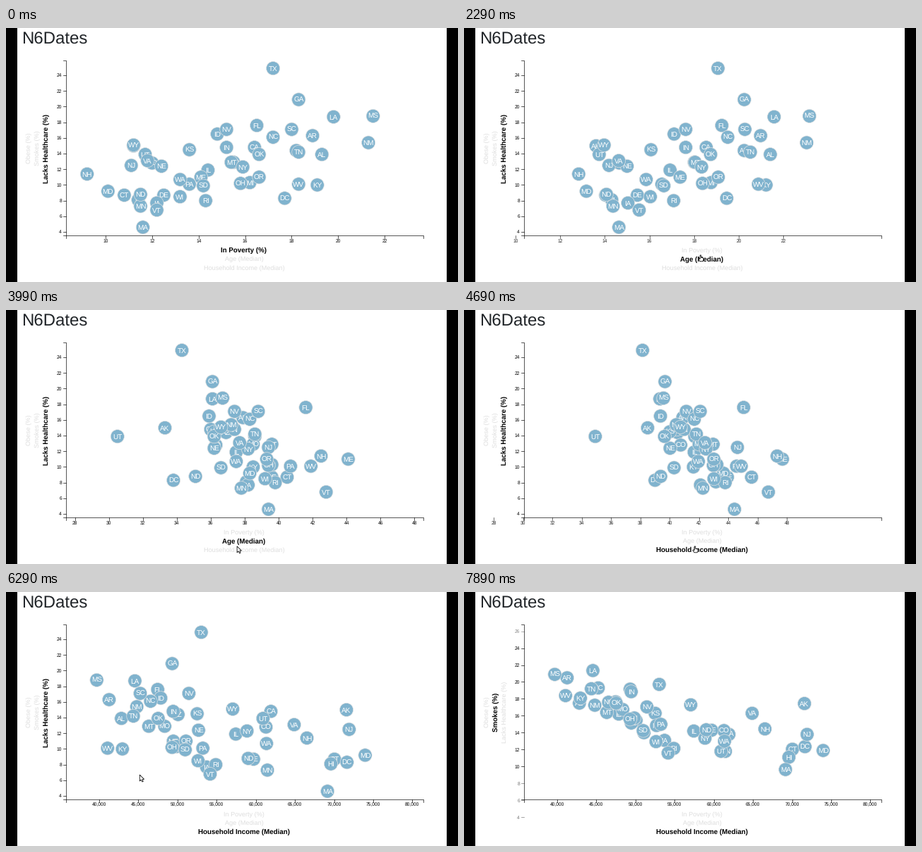
These frames come from a looping animation (640x360 px, 7.99 s). A matplotlib script:

```python
import numpy as np
import matplotlib.pyplot as plt
from matplotlib.animation import FuncAnimation
from matplotlib.patches import Circle, Polygon, Rectangle

plt.rcParams["font.family"] = "Liberation Sans"
plt.rcParams["text.hinting"] = "none"

W, H = 640, 360
FRAMES, INTERVAL = 170, 47
PT = 0.72  # points per pixel at 100 dpi
LEFT, RIGHT, TOP, BOTTOM = 84.5, 590.5, 46, 293.5
BLUE, PALE = "#80b3ce", "#dedede"

STATES = """AL AK AZ AR CA CO CT DE DC FL GA HI ID IL IN IA KS KY LA ME MD MA MI MN
MS MO MT NE NV NH NJ NM NY NC ND OH OK OR PA RI SC SD TN TX UT VT VA WA WV WI
WY""".split()

poverty = [19.3, 11.2, 18.2, 18.9, 16.4, 12, 10.8, 12.5, 17.7, 16.5, 18.3, 11.4, 14.8,
           14.4, 15.2, 12.2, 13.6, 19.1, 19.8, 14.1, 10.1, 11.6, 16.2, 11.5, 21.5, 15.5,
           15.4, 12.4, 15.2, 9.2, 11.1, 21.3, 15.9, 17.2, 11.5, 15.8, 16.6, 16.6, 13.6,
           14.3, 18, 14.2, 18.3, 17.2, 11.7, 12.2, 11.8, 13.2, 18.3, 13.2, 11.2]
age = [38.6, 33.3, 36.9, 37.9, 36, 36.3, 40.5, 39.6, 33.8, 41.6, 36.1, 38.1, 35.9,
       37.5, 37.4, 38.2, 36.2, 38.5, 36.1, 44.1, 38.3, 39.4, 39.6, 37.8, 36.7, 38.5,
       39.6, 36.2, 37.4, 42.5, 39.4, 37.2, 38.2, 38.3, 35.1, 39.4, 36.2, 39.3, 40.7,
       39.8, 38.8, 36.6, 38.6, 34.3, 30.5, 42.8, 37.7, 37.5, 41.9, 39.2, 36.6]
income = [42830, 71583, 50068, 41262, 61933, 61303, 70048, 59716, 71648, 47463, 49321,
          69592, 47861, 57444, 49446, 53712, 52504, 42958, 44555, 49462, 73971, 69160,
          49847, 61481, 39680, 48363, 46328, 52686, 51450, 66532, 71919, 44803, 58878,
          46556, 59029, 49308, 47529, 51075, 53234, 54891, 45238, 50979, 44361, 53035,
          60922, 54166, 64902, 61366, 41059, 52622, 57055]
healthcare = [13.9, 15, 14.4, 16.3, 14.8, 12.8, 8.7, 8.7, 8.3, 17.6, 20.9, 8.1, 16.5,
              11.9, 14.8, 7.7, 14.5, 10, 18.7, 11, 9.2, 4.6, 10.3, 7.3, 18.8, 12.9,
              12.9, 12.4, 17.1, 11.4, 12.5, 15.4, 12.3, 16.1, 8.8, 10.2, 13.9, 11, 10.1,
              8, 17.1, 9.9, 14.2, 24.9, 13.9, 6.8, 13.1, 10.7, 10.1, 8.5, 15.1]
smokes = [21.1, 19.9, 16.5, 24.7, 12.8, 15.7, 15.4, 19.9, 16.4, 17.7, 17.4, 14.1, 15.9,
          16.5, 22.9, 18.5, 18.1, 26.2, 24, 19.3, 14.6, 14.7, 21.2, 16.3, 23, 20.6,
          19.9, 17.3, 17, 17.5, 15.1, 19.1, 14.4, 19.1, 19.9, 21, 21.1, 17, 19.9,
          16.3, 21.5, 18.6, 24.2, 14.5, 9.7, 16.4, 19.5, 15.3, 26.7, 17.4, 19.5]


class Variable:
    """A data column with its linear scale and axis ticks."""

    def __init__(self, data, domain, span, ticks):
        self.data = np.array(data, float)
        self.domain, self.span, self.ticks = domain, span, set(ticks)

    def scale(self, v):
        (d0, d1), (r0, r1) = self.domain, self.span
        return r0 + (v - d0) * (r1 - r0) / (d1 - d0)


def x_variable(data, ticks):
    return Variable(data, (min(data) * 0.9, max(data) * 1.1), (LEFT, RIGHT), ticks)


def y_variable(data, ticks):
    return Variable(data, (min(data) - 1, max(data) + 1), (BOTTOM, TOP), ticks)


VARS = {
    "poverty": x_variable(poverty, range(10, 23, 2)),
    "age": x_variable(age, range(28, 49, 2)),
    "income": x_variable(income, range(40000, 80001, 5000)),
    "healthcare": y_variable(healthcare, range(4, 25, 2)),
    "smokes": y_variable(smokes, range(10, 27, 2)),
}

# click times (ms) and the variable each one selects
X_STORY = [(-2000, "poverty"), (1960, "age"), (4366, "income")]
Y_STORY = [(-2000, "healthcare"), (7404, "smokes")]
HOVER = {"age": (1700, 1960), "income": (4000, 4366), "smokes": (6800, 7404)}

PATH_T = [1200, 1700, 3290, 4000, 5800, 6800]
PATH_X = [345, 335, 335, 327, 327, 46]
PATH_Y = [298, 322, 322, 335, 335, 180]
CURSOR_SPAN = (1200, 7600)
HAND = np.array([(-1, 0), (1, 0), (1, 4), (5, 5), (5, 8), (4, 11),
                 (-1, 11), (-4, 7), (-3, 6), (-1, 7)]) * 0.8
ARROW = np.array([(0, 0), (0, 9), (2, 7), (3.5, 10), (5, 9.4), (3.7, 6.5), (6.3, 6.3)])

fig = plt.figure(figsize=(W / 100, H / 100), dpi=100, facecolor="white")
ax = fig.add_axes([0, 0, 1, 1])
ax.set_xlim(0, W)
ax.set_ylim(H, 0)
ax.axis("off")


def write(x, y, s, size, **kw):
    kw.setdefault("ha", "center")
    return ax.text(x, y, s, fontsize=size * PT, va="baseline", **kw)


def stroke(xs, ys):
    return ax.plot(xs, ys, color="black", lw=0.66 * PT, zorder=2)[0]


for x0, x1 in ((0, 16), (623.5, W)):
    ax.add_patch(Rectangle((x0, 0), x1 - x0, H, color="black", lw=0, zorder=20))
write(22, 23, "N6Dates", 24, ha="left", color="#212529")
stroke([LEFT, LEFT, RIGHT, RIGHT], [BOTTOM + 4, BOTTOM, BOTTOM, BOTTOM + 4])
stroke([LEFT - 4, LEFT, LEFT, LEFT - 4], [TOP, TOP, BOTTOM, BOTTOM])


def make_ticks(names, horizontal):
    ticks = {}
    for v in sorted(set().union(*(VARS[n].ticks for n in names))):
        label = write(LEFT - 5.5, BOTTOM + 10, f"{v:,}", 6.7, zorder=2,
                      ha="center" if horizontal else "right")
        ticks[v] = stroke([0, 0], [0, 0]), label
    return ticks


x_ticks = make_ticks(["poverty", "age", "income"], True)
y_ticks = make_ticks(["healthcare", "smokes"], False)

labels = {}
for key, text, y in (("poverty", "In Poverty (%)", 314.5), ("age", "Age (Median)", 327),
                     ("income", "Household Income (Median)", 339.5)):
    labels[key] = write(337, y + 3.5, text, 9.2)
for key, text, x in (("obesity", "Obese (%)", 32), ("smokes", "Smokes (%)", 44),
                     ("healthcare", "Lacks Healthcare (%)", 56.5)):
    labels[key] = write(x + 3.5, 170.5, text, 9.2, rotation=90, rotation_mode="anchor")

dots = []
for i, abbr in enumerate(STATES):
    z = 5 + i * 0.1
    dot = Circle((0, 0), 9.6, fc=BLUE, ec="#e3e3e3", lw=0.66 * PT, zorder=z)
    ax.add_patch(dot)
    dots.append((dot, write(0, 0, abbr, 10, color="white", zorder=z + 0.05)))

cursor = Polygon(HAND, closed=True, fc="white", ec="black", lw=0.8 * PT, zorder=15)
ax.add_patch(cursor)


def ease(u):
    u = min(max(u, 0), 1)
    return 4 * u**3 if u < 0.5 else 1 - 4 * (1 - u) ** 3


def stage(story, t):
    """Previous variable, current variable and eased progress between them."""
    k = max(i for i, (start, _) in enumerate(story) if start <= t)
    start, name = story[k]
    return VARS[story[max(k - 1, 0)][1]], VARS[name], ease((t - start) / 1000), name


def blend(a, b, p):
    return a + (b - a) * p


def place_ticks(ticks, old, new, p, horizontal):
    for v, (line, label) in ticks.items():
        alpha = blend(v in old.ticks, v in new.ticks, p) if old is not new else v in new.ticks
        pos = blend(old.scale(v), new.scale(v), p)
        shown = alpha > 0.005 and -20 < pos < W + 20
        for part in (line, label):
            part.set_visible(shown)
            part.set_alpha(float(alpha))
        if horizontal:
            line.set_data([pos, pos], [BOTTOM, BOTTOM + 4])
            label.set_x(pos)
        else:
            line.set_data([LEFT - 4, LEFT], [pos, pos])
            label.set_y(pos + 2.4)


def style_labels(active, t):
    for key, label in labels.items():
        on = key in active
        start, end = HOVER.get(key, (0, 0))
        label.set_fontweight("bold" if on else "normal")
        label.set_fontsize((9.75 if on else 9.2) * PT)
        label.set_color("black" if on else "#555555" if start <= t < end else PALE)


def place_cursor(t):
    cursor.set_visible(CURSOR_SPAN[0] <= t < CURSOR_SPAN[1])
    tip = np.array([np.interp(t, PATH_T, PATH_X), np.interp(t, PATH_T, PATH_Y)])
    moving = any(a <= t < b for a, b in zip(PATH_T[::2], PATH_T[1::2]))
    cursor.set_xy(tip + (ARROW if moving else HAND))


def draw(i):
    t = ((i + 1) * INTERVAL - 91) // 100 * 100 + 90  # screen refreshes every 100 ms
    x_old, x_new, px, x_name = stage(X_STORY, t)
    y_old, y_new, py, y_name = stage(Y_STORY, t)
    place_ticks(x_ticks, x_old, x_new, px, True)
    place_ticks(y_ticks, y_old, y_new, py, False)
    style_labels((x_name, y_name), t)
    xs = blend(x_old.scale(x_old.data), x_new.scale(x_new.data), px)
    ys = blend(y_old.scale(y_old.data), y_new.scale(y_new.data), py)
    for (dot, label), x, y in zip(dots, xs, ys):
        dot.center = x, y
        label.set_position((x, y + 3.6))
    place_cursor(t)
    return []


anim = FuncAnimation(fig, draw, frames=FRAMES, interval=INTERVAL, repeat=True,
                     repeat_delay=0, blit=False)
plt.show()
```
